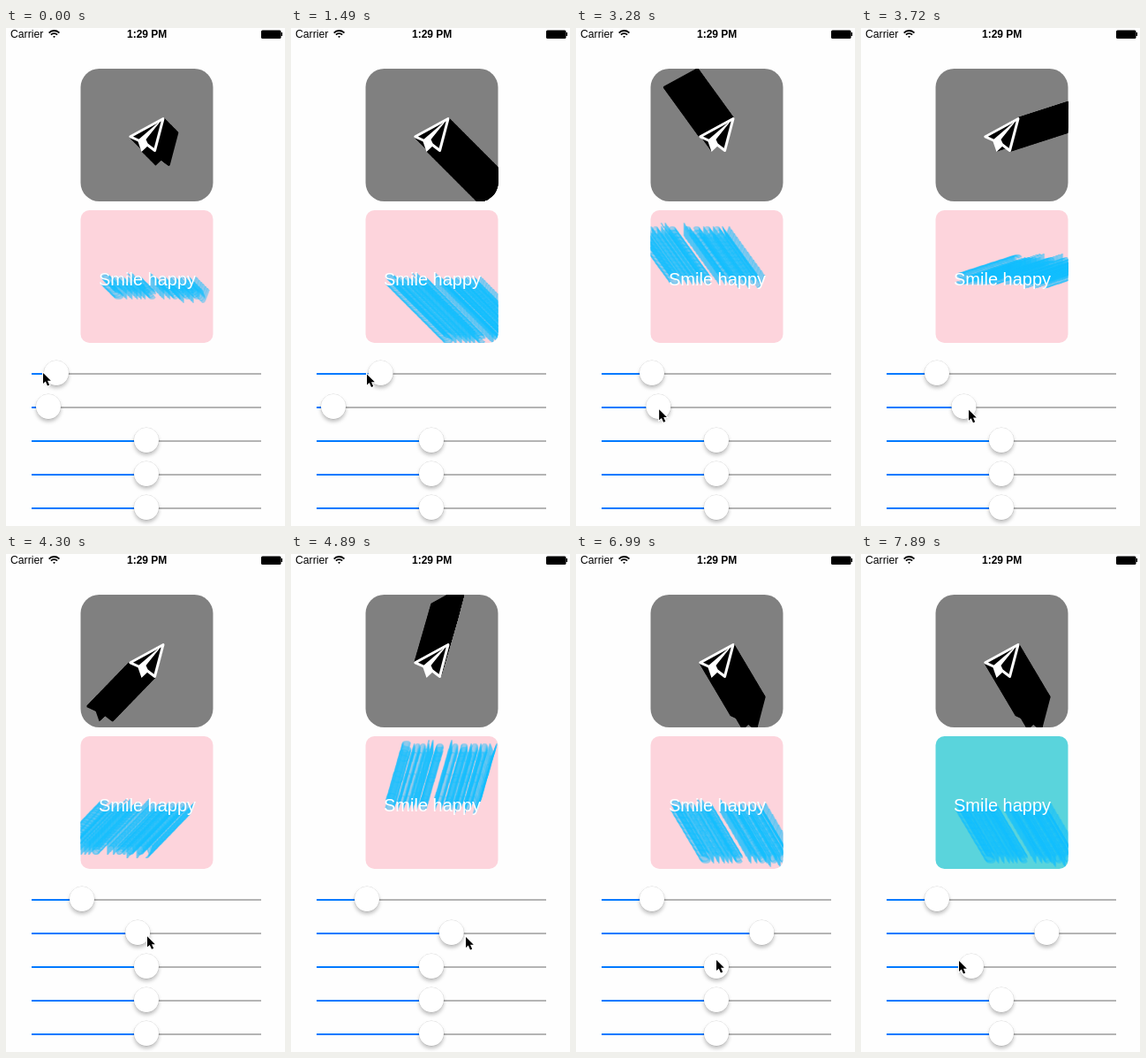
Animation of 316 by 563 pixels, one loop 8 s. Source, as an HTML page with a canvas:

```html
<!DOCTYPE html>
<html>
<head>
<meta charset="utf-8">
<title>Long shadow sliders</title>
<style>
html, body { margin: 0; width: 100%; height: 100%; overflow: hidden; background: #fefefe; }
canvas { display: block; }
</style>
</head>
<body>
<canvas id="stage" width="316" height="563"></canvas>
<script>
const g = document.getElementById('stage').getContext('2d');
const LOOP = 8000, STEP = 148.7; // the picture advances once per STEP ms
const FONT = '"Liberation Sans", Arial, sans-serif';

// Where each drag turns, as [step, x].
const lengthDrag = [[1, 57], [8, 112], [13, 86]];
const angleDrag = [[15, 48], [18, 62.3], [25, 116.5], [33, 181.8], [40, 208.2], [43, 210.4]];
const redDrag = [[47, 159], [53, 125]];
const pointer = [[1, 41], [8, 95], [15, 60], [18, 56], [25, 121], [33, 197], [44, 218], [47, 158], [53, 110]];

const progress = (k, from, to) => Math.min(1, Math.max(0, (k - from) / (to - from)));
const ease = p => p * p * (3 - 2 * p);
const value = x => (x - 43) / 232;

// Sum of the clamped moves between turns.
function at(turns, k) {
  return turns.reduce((x, [t, to], i) => {
    if (!i) return to;
    const [t0, from] = turns[i - 1];
    return x + (to - from) * progress(k, t0, t);
  }, 0);
}

function text(str, x, y, font, color) {
  g.font = font + ' ' + FONT;
  g.fillStyle = color;
  g.fillText(str, x, y);
}

const planeFrame = new Path2D('M178 102.5L140.8 122.8L151 127.5L160 132L168.5 138.5Z');
const planeFold = new Path2D('M149 127L177 103L158.5 126L161.5 132.5L153.5 140Z');

function plane(color) {
  g.strokeStyle = g.fillStyle = color;
  g.lineWidth = 3;
  g.lineJoin = 'round';
  g.stroke(planeFrame);
  g.fill(planeFold);
}

function smile(color) {
  text('Smile happy', 105, 291, '20px', color);
}

// A rounded card whose content is repeated along the shadow direction.
function card(y, radius, color, draw, shade, alpha, len, angle) {
  g.save();
  g.beginPath();
  g.roundRect(84.5, y, 150, 150, radius);
  g.fillStyle = color;
  g.fill();
  g.clip();
  g.globalAlpha = alpha;
  for (let d = len; d > 0; d--) {
    g.save();
    g.translate(d * Math.cos(angle), d * Math.sin(angle));
    draw(shade);
    g.restore();
  }
  g.globalAlpha = 1;
  draw('#fff');
  g.restore();
}

function slider(x, y) {
  g.fillStyle = '#b4b4b4';
  g.fillRect(29, y, 260, 2);
  g.fillStyle = '#007aff';
  g.fillRect(29, y, x - 29, 2);
  g.save();
  g.beginPath();
  g.arc(x, y, 14, 0, 7);
  g.strokeStyle = 'rgba(0,0,0,.15)';
  g.lineWidth = 1;
  g.stroke();
  g.shadowColor = 'rgba(0,0,0,.25)';
  g.shadowBlur = 4;
  g.shadowOffsetY = 3;
  g.fillStyle = '#fff';
  g.fill();
  g.restore();
}

function statusBar() {
  text('Carrier', 5, 11, '12.2px', '#000');
  text('1:29 PM', 137, 11, 'bold 12px', '#000');
  g.strokeStyle = '#000';
  g.lineWidth = 1.8;
  for (const r of [1, 4.9, 8]) {
    g.beginPath();
    g.arc(54.5, 11, r, -Math.PI * .76, -Math.PI * .24);
    g.stroke();
  }
  g.beginPath();
  g.roundRect(289, 2.5, 22.5, 9.5, 1.5);
  g.fill();
  g.fillRect(311.5, 5, 1.5, 4);
}

const arrow = new Path2D('M0 0V12L2.8 9.6L5 14.5L7.2 13.5L5 8.8H8.8Z');

function cursor(x, y) {
  g.save();
  g.translate(x, y);
  g.strokeStyle = '#fff';
  g.lineWidth = 2;
  g.stroke(arrow);
  g.fillStyle = '#000';
  g.fill(arrow);
  g.restore();
}

function frame(now) {
  const k = Math.floor(now % LOOP / STEP + .15);
  const x1 = at(lengthDrag, k), x2 = at(angleDrag, k), x3 = at(redDrag, k);
  const len = 1.6 * (x1 - 43);
  // Preset angle and colour hold until their sliders are touched.
  const angle = x2 > 48 ? value(x2) * Math.PI * 6 : Math.PI / 4;
  const red = x3 < 159 ? 255 * value(x3) : 253;
  // The pointer drifts down slowly and glides from row to row.
  const py = 390 + .15 * k + 38 * ease(progress(k, 10, 17)) + 24 * ease(progress(k, 44, 47));

  g.fillStyle = '#fefefe';
  g.fillRect(0, 0, 316, 563);
  statusBar();
  card(46, 21, '#808080', plane, '#000', 1, len, angle);
  card(206, 10, `rgb(${red},212,220)`, smile, '#14beff', .36, len, angle);
  [x1, x2, x3, 159, 159].forEach((x, i) => slider(x, 390 + 38 * i));
  cursor(at(pointer, k) + 1, py);
  requestAnimationFrame(frame);
}
requestAnimationFrame(frame);
</script>
</body>
</html>
```
